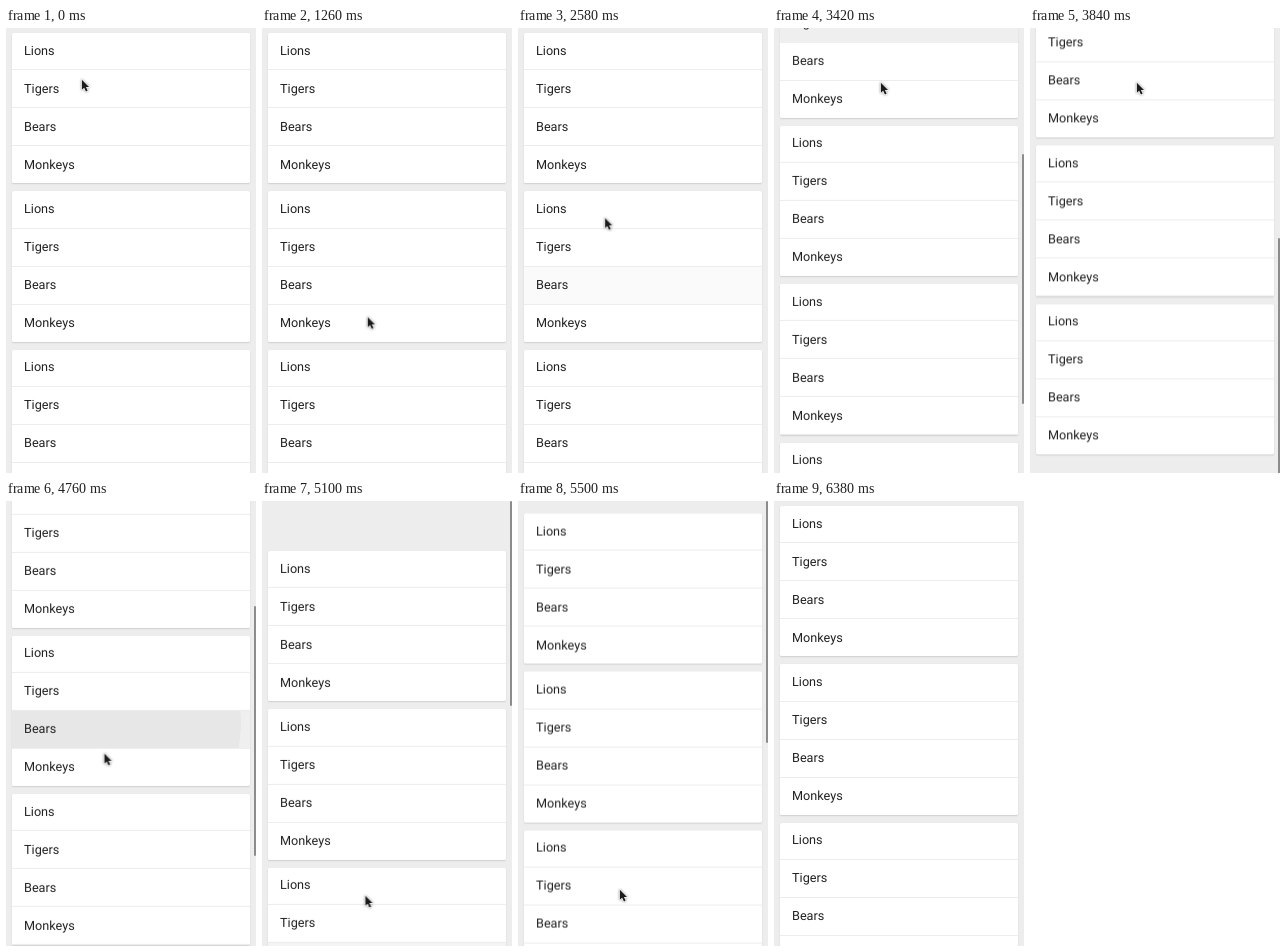
Write an HTML page that moves like this. It is 250 px wide and 445 px high and loops after 7220 ms.

```html
<!DOCTYPE html>
<html lang="en">
<head>
<meta charset="utf-8">
<title>Animal lists</title>
<style>
@property --s { syntax: "<number>"; inherits: true; initial-value: 0; }

html, body { margin: 0; width: 100%; height: 100%; overflow: hidden; background: #ededed; }

#stage {
  --loop: 7220ms;
  position: relative; width: 250px; height: 445px; overflow: hidden;
  background: #ededed;
  animation: scroll var(--loop) linear infinite;
}
#list { position: absolute; inset: 0; transform: translateY(calc(var(--s) * -1px)); will-change: transform; }

.card {
  position: absolute; left: 6px; width: 238px; height: 150.4px;
  border-radius: 1.6px; background: #fff;
  box-shadow: 0 1px 1.6px rgba(0,0,0,.13), 0 0 1.5px rgba(0,0,0,.06);
}
.rows { position: absolute; inset: 0; overflow: hidden; border-radius: inherit; }
.row {
  position: relative; top: -.8px; height: 38px; padding-left: 12px;
  box-sizing: border-box; overflow: hidden;
  border-bottom: 1px solid #ededed;
  font: 12.67px/38px Roboto, sans-serif; color: #222;
  text-rendering: geometricPrecision;
}
.row span { position: relative; top: .3px; }

.tint, .wave { position: absolute; background: #000; opacity: 0; animation: var(--loop) linear var(--at) infinite; }
.tint { inset: 0; }
.tap { animation-name: tap; }
.press { animation-name: press; }
.wave {
  left: calc(var(--x) - 240px); top: -228px; width: 480px; height: 480px;
  border-radius: 50%; animation-name: wave;
}

#bar {
  position: absolute; left: 247.6px; width: 2px; border-radius: 1px;
  --over: max(0, var(--s) - 349);
  top: calc((clamp(0, var(--s) * .562, 196) + var(--over)) * 1px);
  height: calc((250 - var(--over) - max(0, 0 - var(--s))) * 1px);
  background: #8c8c8c; opacity: 0; will-change: opacity;
  animation: bar var(--loop) linear infinite;
}

#cursor {
  position: absolute; left: 0; top: 0; width: 12px; height: 16.3px; overflow: visible;
  filter: drop-shadow(0 .8px .8px rgba(0,0,0,.4));
  animation: cursor var(--loop) ease-in-out infinite;
}

/* drag, fling, overscroll and settle, once down and once up */
@keyframes scroll {
  0%, 43.21% { --s: 0; }
  45.71% { --s: 162; }
  47.37% { --s: 223.7; }
  50.97% { --s: 345; animation-timing-function: ease-out; }
  52.49% { --s: 365; }
  53.19% { --s: 362.7; animation-timing-function: ease-out; }
  58.73%, 63.57% { --s: 349; }
  65.93% { --s: 188; }
  67.87% { --s: 44; animation-timing-function: ease-out; }
  69.94% { --s: -47; }
  70.64% { --s: -45; }
  73.68% { --s: -14; animation-timing-function: ease-out; }
  81.72%, 100% { --s: 0; }
}
@keyframes cursor {
  0%, 8.31% { transform: translate(75px, 51px); animation-timing-function: ease-in; }
  13.02% { transform: translate(88px, 203px); animation-timing-function: ease-out; }
  15.79% { transform: translate(115px, 326px); }
  19.11%, 31.86% { transform: translate(95px, 252px); animation-timing-function: ease-in; }
  35.73% { transform: translate(86px, 190px); animation-timing-function: ease-out; }
  37.95% { transform: translate(97px, 142px); }
  41%, 43.07% { transform: translate(104px, 214px); animation-timing-function: linear; }
  45.98%, 53.46% { transform: translate(106px, 54px); }
  60.94%, 63.57% { transform: translate(103px, 88px); animation-timing-function: linear; }
  65.93% { transform: translate(97.5px, 251px); animation-timing-function: linear; }
  67.87%, 73.96% { transform: translate(102.5px, 394px); }
  75.9%, 86.43% { transform: translate(101px, 388px); animation-timing-function: ease-in; }
  88.09% { transform: translate(229px, 294px); animation-timing-function: linear; }
  88.35%, 100% { transform: translate(262px, 270px); }
}
@keyframes bar {
  0%, 43.2% { opacity: 0; }
  43.9%, 80% { opacity: 1; }
  83.3%, 100% { opacity: 0; }
}
@keyframes tap {
  0% { opacity: 0; }
  2.08%, 2.77% { opacity: .04; }
  12.47%, 100% { opacity: 0; }
}
@keyframes press {
  0% { opacity: 0; }
  2.08%, 5.54% { opacity: .062; }
  12.47%, 100% { opacity: 0; }
}
@keyframes wave {
  0% { opacity: .07; transform: scale(0); }
  4.99%, 100% { opacity: 0; transform: scale(1); }
}
</style>
</head>
<body>
<div id="stage">
  <div id="list"></div>
  <div id="bar"></div>
  <svg id="cursor" viewBox="0 0 14 19">
    <path d="M1 1v11.6l2.7-2.5 2 4.6 2.1-.9-2-4.5h3.6z" fill="#1c1c1c" stroke="#fff" stroke-width="1.6" paint-order="stroke" stroke-linejoin="round"/>
  </svg>
</div>
<script>
const NAMES = ['Lions', 'Tigers', 'Bears', 'Monkeys'];
const TOUCHES = [
  { card: 0, row: 1, x: 75, at: 220, kind: 'tap' },
  { card: 1, row: 2, x: 95, at: 2020, kind: 'tap' },
  { card: 1, row: 1, x: 104, at: 3080, kind: 'press' },
  { card: 2, row: 2, x: 103, at: 4563, kind: 'press' },
];

function add(parent, className, tag = 'div') {
  const el = document.createElement(tag);
  el.className = className;
  return parent.appendChild(el);
}

const list = document.getElementById('list');
for (let card = 0; card < 5; card++) {
  const box = add(list, 'card');
  box.style.top = 5 + card * 158.4 + 'px';
  const rows = add(box, 'rows');
  NAMES.forEach((name, i) => {
    const row = add(rows, 'row');
    const touch = TOUCHES.find(t => t.card === card && t.row === i);
    if (touch) {
      row.style.setProperty('--x', touch.x - 6 + 'px');
      row.style.setProperty('--at', touch.at + 'ms');
      add(row, 'tint ' + touch.kind);
      add(row, 'wave');
    }
    add(row, '', 'span').textContent = name;
  });
}
</script>
</body>
</html>
```
